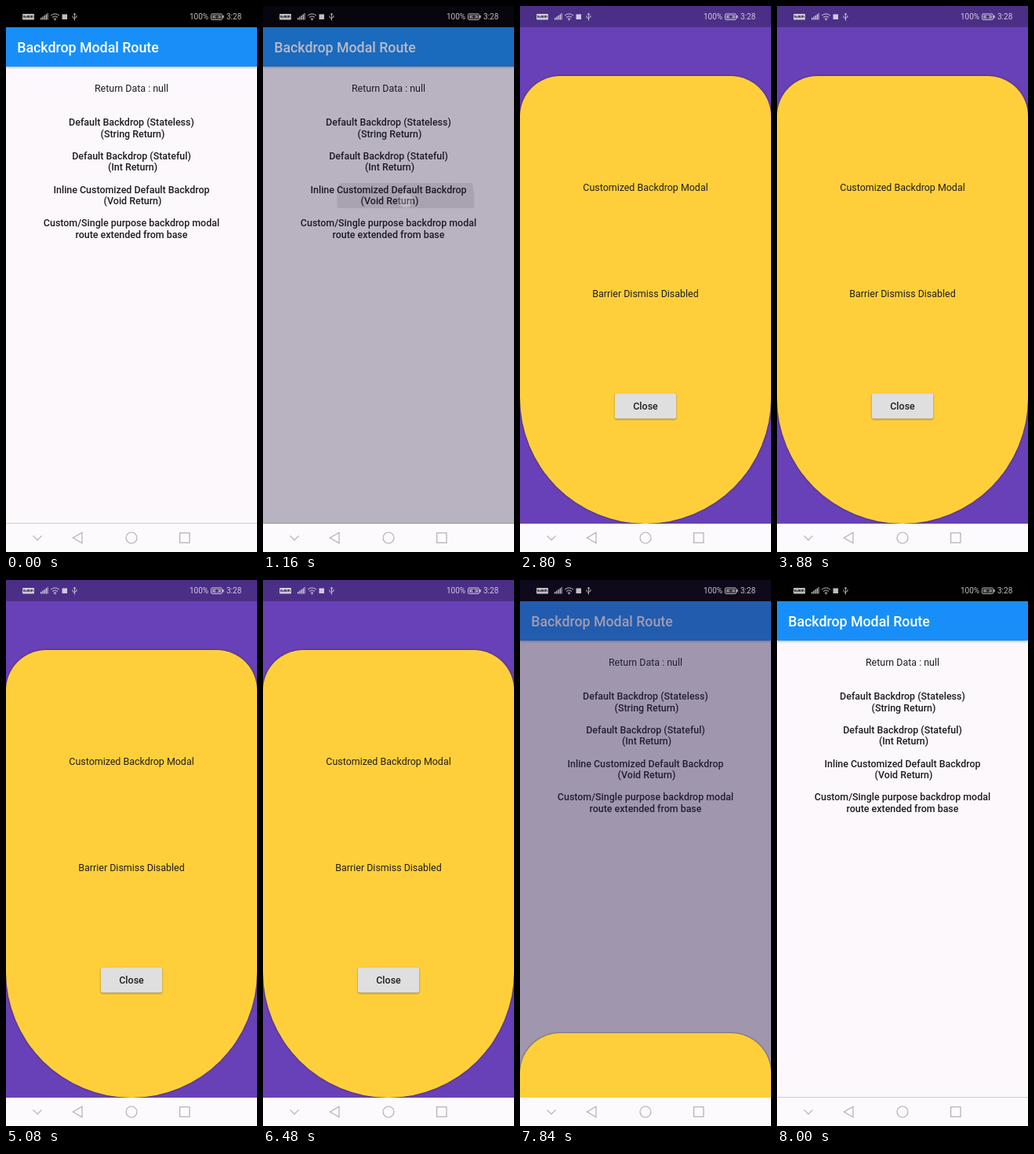
Animation of 320 by 694 pixels, one loop 8.56 s. Source, as an HTML page:

```html
<!DOCTYPE html>
<html lang="en">
<head>
<meta charset="utf-8">
<title>Backdrop Modal Route</title>
<style>
  html, body { margin: 0; width: 100%; height: 100%; overflow: hidden; background: #fcf8fb; }
  svg { display: block; width: 100%; height: 100%; }
  text { font: 400 12.44px Roboto, sans-serif; fill: #1f1d20; }
  .mid { text-anchor: middle; }
  .strong text, text.strong { font-weight: 500; }
  .title { font-size: 17.78px; font-weight: 500; fill: #fff; }
  .appbar { fill: #188ff8; filter: drop-shadow(0 1.5px 1.5px rgba(0, 0, 0, .3)); }
  .status { opacity: .74; fill: #fff; }
  .status text { font-size: 10px; fill: #fff; }
  .status .badge { font-size: 4.4px; font-weight: 700; fill: #000; }
  .line { fill: none; stroke: #fff; }
  .nav { fill: none; stroke: #b3adb5; stroke-width: 1.2; }
  .sheet-shape { fill: #ffcf3b; filter: drop-shadow(0 .8px .8px rgba(30, 15, 20, .75)); }
  .raised { fill: #e0dfe0; filter: drop-shadow(0 1px 1px rgba(0, 0, 0, .4)); }
  .dot { fill: rgba(246, 244, 248, .7); stroke: rgba(165, 160, 168, .75); }

  .barrier, .sheet, .splash, .dot { animation: 8560ms linear infinite; }
  .barrier { animation-name: barrier; }
  .sheet { animation-name: sheet; }
  .splash { animation-name: splash; transform-origin: 182px 247px; }
  .tap-open { animation-name: tap-open; }
  .tap-close { animation-name: tap-close; }

  /* Tint and opacity rise together, from clear black to solid purple. */
  @keyframes barrier {
    0%, 12.5% { opacity: 0; fill: #000; }
    16.005%, 89.661% { opacity: 1; fill: #6841b8; }
    93.166%, 100% { opacity: 0; fill: #000; }
  }
  @keyframes sheet {
    0% { transform: translateY(658px); }
    12.5% { transform: translateY(658px); animation-timing-function: ease-in; }
    16.005% { transform: none; }
    89.661% { transform: none; animation-timing-function: ease-out; }
    93.166%, 100% { transform: translateY(658px); }
  }
  @keyframes splash {
    0%, 11.4% { transform: scale(.1); opacity: 0; }
    11.7% { transform: scale(.2); opacity: 1; }
    13.6% { transform: scale(1); opacity: 1; }
    14.5%, 100% { transform: scale(1.2); opacity: 0; }
  }
  @keyframes tap-open {
    0%, 11.2% { opacity: 0; }
    11.21%, 13.1% { opacity: 1; }
    13.55% { opacity: .4; }
    13.9%, 100% { opacity: 0; }
  }
  @keyframes tap-close {
    0%, 86.9% { opacity: 0; }
    86.91%, 89.4% { opacity: 1; }
    89.9%, 100% { opacity: 0; }
  }
</style>
</head>
<body>
<svg viewBox="0 0 320 694" preserveAspectRatio="none">
  <defs>
    <clipPath id="button"><rect x="46" y="225" width="228" height="32" rx="2"/></clipPath>
    <clipPath id="screen"><rect width="320" height="658"/></clipPath>
  </defs>

  <g clip-path="url(#screen)">
    <!-- Page -->
    <rect width="320" height="658" fill="#fcf8fb"/>
    <rect class="appbar" width="320" height="77"/>
    <rect width="320" height="27" fill="#020202"/>
    <rect y="657" width="320" height="1" fill="#cfcbd0"/>
    <text class="title" x="14.2" y="59">Backdrop Modal Route</text>
    <text class="mid" x="160" y="109.4">Return Data : null</text>
    <g clip-path="url(#button)">
      <circle class="splash" cx="182" cy="247" r="89" fill="rgba(0,0,0,.09)"/>
    </g>
    <g class="mid strong">
      <text x="160" y="152.2">Default Backdrop (Stateless)</text>
      <text x="161.5" y="166.6">(String Return)</text>
      <text x="160" y="194.9">Default Backdrop (Stateful)</text>
      <text x="161.5" y="209.3">(Int Return)</text>
      <text x="160" y="237.5">Inline Customized Default Backdrop</text>
      <text x="161.5" y="251.9">(Void Return)</text>
      <text x="160" y="280.2">Custom/Single purpose backdrop modal</text>
      <text x="160" y="294.6">route extended from base</text>
    </g>

    <rect class="barrier" width="320" height="658"/>

    <!-- Modal sheet -->
    <g class="sheet">
      <path class="sheet-shape" d="M0 140A51 51 0 0 1 51 89H269A51 51 0 0 1 320 140V498A160 160 0 0 1 0 498Z"/>
      <text class="mid" x="160" y="235.4">Customized Backdrop Modal</text>
      <text class="mid" x="160" y="370.4">Barrier Dismiss Disabled</text>
      <rect class="raised" x="121" y="492.4" width="78.2" height="32" rx="1.8"/>
      <text class="mid strong" x="160" y="513.2">Close</text>
    </g>
  </g>

  <!-- Status bar -->
  <rect width="320" height="27" fill="rgba(0,0,0,.27)"/>
  <g class="status">
    <rect x="21" y="10" width="15" height="7.5" rx="1"/>
    <text class="badge mid" x="28.5" y="15.4">VoWiFi</text>
    <path d="M44 15h1.4v2.5H44zM46.2 13.5h1.4v4h-1.4zM48.4 12h1.4v5.5h-1.4zM50.6 10.5H52v7h-1.4zM52.6 9h1v8.5h-1z"/>
    <path class="line" d="M57 12.2Q62.5 7.6 68 12.2M59 14.4Q62.5 11.4 66 14.4M60.8 16.4Q62.5 15 64.2 16.4"/>
    <circle cx="62.5" cy="17.4" r=".9"/>
    <rect x="71.5" y="10.5" width="6.5" height="6.5"/>
    <path class="line" stroke-width=".9" d="M87.5 18.5V9.5M86 11l1.5-1.8L89 11M87.5 16.2L85 14.6V12.4M87.5 15.4L90 14V12"/>
    <text x="234" y="17.4">100%</text>
    <rect class="line" x="261.5" y="10" width="14" height="7.4" rx="1.5"/>
    <rect x="263" y="11.5" width="11" height="4.4" opacity=".65"/>
    <rect x="276.4" y="12" width="1.4" height="3.4"/>
    <path d="M265.5 14.2L269.5 11.4V13.2H272L268 16V14.2Z" fill="#222"/>
    <text x="281" y="17.4">3:28</text>
  </g>

  <!-- Navigation bar -->
  <rect y="658" width="320" height="36" fill="#fdfafd"/>
  <g class="nav">
    <path d="M34.5 673.3L40 678.8L45.5 673.3"/>
    <path d="M97 669.2V682.8L85.3 676Z"/>
    <circle cx="160" cy="676" r="7"/>
    <rect x="221.6" y="669.8" width="12.4" height="12.4"/>
  </g>

  <circle class="dot tap-open" cx="182" cy="247" r="9.5"/>
  <circle class="dot tap-close" cx="166" cy="517" r="9.5"/>
</svg>
</body>
</html>
```
